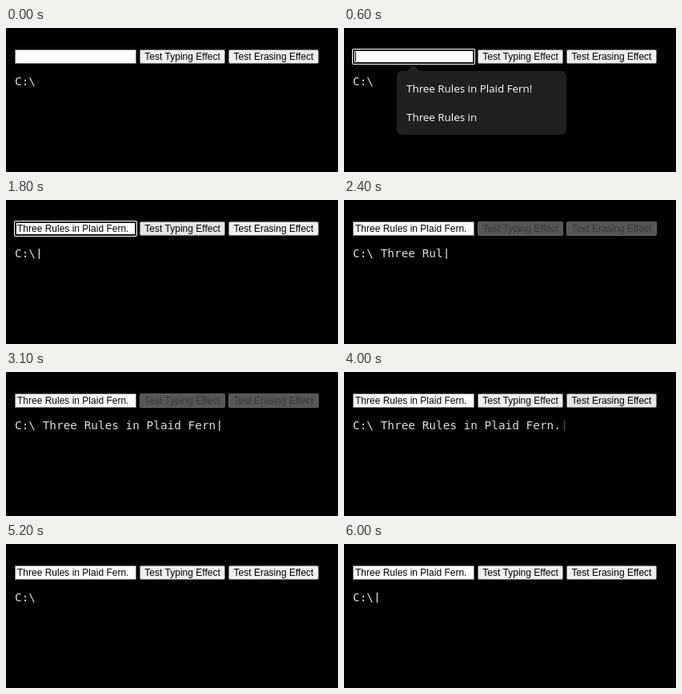
An HTML page with a canvas for the animation above (6.2 s loop, 415x181 px).

```html
<!DOCTYPE html>
<html lang="en">
<head>
<meta charset="utf-8">
<title>Typing effect</title>
<style>
html, body { margin: 0; width: 100%; height: 100%; overflow: hidden; background: #000; }
canvas { display: block; width: 415px; height: 181px; }
</style>
</head>
<body>
<canvas id="stage"></canvas>
<script>
const W = 415, H = 181, LOOP = 6200, STEP = 100;
const PROMPT = "C:\\", RULES = "Three Rules in Plaid Fern";
const LINE = PROMPT + " " + RULES + ".";
const UI = '12px "Liberation Sans", Arial, sans-serif';
const MONO = '14.4px "DejaVu Sans Mono", monospace';
const MENU = '13.4px "Open Sans", sans-serif';
const ADVANCE = 8.67;

// [time, value] keys: held for blink and input, interpolated for length
const blink = [[0, 0], [100, 1], [400, 0], [700, 1], [900, 0], [1200, 1], [1500, 0],
  [1800, 1], [3400, 0.5], [3500, 0], [3700, 1], [4000, 0.35], [4100, 1],
  [5200, 0], [5500, 1], [5700, 0.5], [5800, 0], [6000, 1]];
const input = [[0, ""], [1000, RULES + "!"], [1200, RULES], [1500, RULES + "."]];
const typed = [[0, 3], [2000, 3], [2600, 18], [3100, 29], [3200, 30],
  [4000, 30], [4600, 15], [4900, 3], [LOOP, 3]];

const canvas = document.getElementById("stage");
const dpr = window.devicePixelRatio || 1;
canvas.width = W * dpr;
canvas.height = H * dpr;
const ctx = canvas.getContext("2d");
ctx.scale(dpr, dpr);

const within = (t, a, b) => t >= a && t < b;
const hold = (keys, t) => keys.filter(k => k[0] <= t).pop()[1];

function lerpKeys(keys, t) {
  const i = keys.findIndex(k => k[0] > t);
  const [t0, v0] = keys[i - 1], [t1, v1] = keys[i];
  return v0 + (v1 - v0) * (t - t0) / (t1 - t0);
}

function box(x, y, w, h, r, color) {
  ctx.fillStyle = color;
  ctx.beginPath();
  ctx.roundRect(x, y, w, h, r);
  ctx.fill();
}

function text(str, x, y, font, color, align = "left") {
  ctx.font = font;
  ctx.fillStyle = color;
  ctx.textAlign = align;
  ctx.fillText(str, x, y);
}

function drawInput(value, focused) {
  if (focused) {
    box(10, 26, 154, 20, 2, "#fff");
    box(11, 27, 152, 18, 1, "#101010");
    box(13, 29, 148, 14, 0, "#fff");
    if (!value) box(14, 30, 1, 12, 0, "#000");
  } else {
    box(11, 27, 152, 18, 0, "#767676");
    box(12, 28, 150, 16, 0, "#fff");
  }
  text(value, 14, 40, UI, "#000");
}

function drawButton(x, w, label, disabled, hover) {
  const fill = disabled ? "#565656" : hover ? "#e5e5e5" : "#efefef";
  box(x, 27, w, 18, 2, disabled ? "#626262" : "#767676");
  box(x + 1, 28, w - 2, 16, 1, fill);
  text(label, x + w / 2, 40, UI, disabled ? "#3a3a3a" : "#000", "center");
}

function drawMenu() {
  box(66, 54, 212, 80, 6, "#202020");
  ctx.beginPath();
  ctx.moveTo(78, 54.5);
  ctx.lineTo(86.5, 46);
  ctx.lineTo(95, 54.5);
  ctx.fill();
  text(RULES + "!", 78, 81, MENU, "#fff");
  text("Three Rules in", 78, 117, MENU, "#fff");
}

function drawConsole(t) {
  const n = Math.round(lerpKeys(typed, t));
  text(LINE.slice(0, n), 11, 72, MONO, "#ddd");
  ctx.globalAlpha = hold(blink, t);
  box(11 + n * ADVANCE + 3.8, 61, 1.2, 13, 0, "#eee");
  ctx.globalAlpha = 1;
}

function draw(t) {
  const busy = within(t, 2100, 3200) || within(t, 4100, 4900);
  box(0, 0, W, H, 0, "#000");
  drawInput(hold(input, t), within(t, 300, 2100));
  drawButton(167, 107, "Test Typing Effect", busy, within(t, 1200, 2100));
  drawButton(278, 113, "Test Erasing Effect", busy, within(t, 3700, 4100));
  drawConsole(t);
  if (within(t, 500, 1100)) drawMenu();
}

function tick() {
  const t = performance.now() % LOOP;
  draw(Math.floor(t / STEP) * STEP);
  requestAnimationFrame(tick);
}
tick();
</script>
</body>
</html>
```
